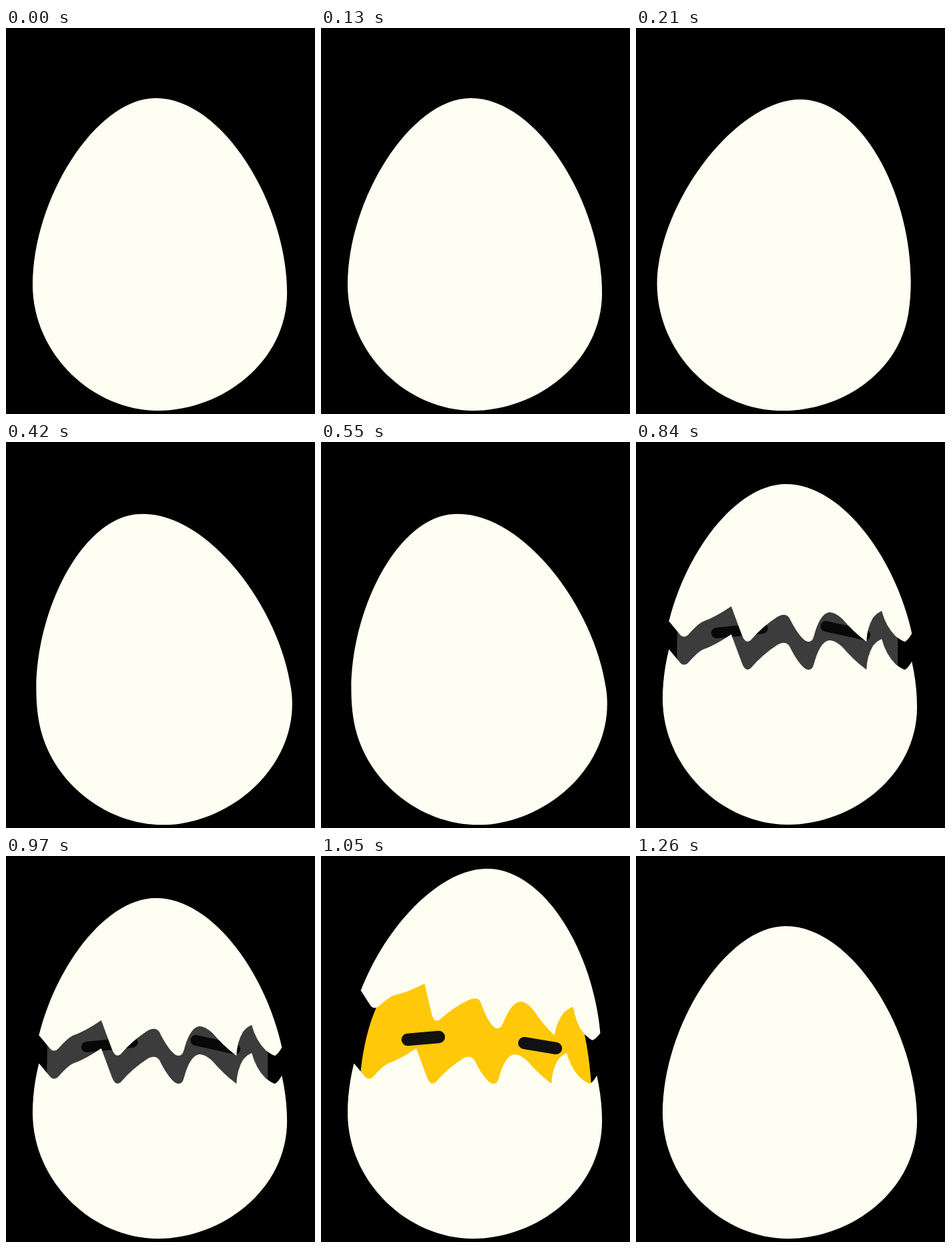
Write an HTML page with a canvas that moves like this. It is 464 px wide and 578 px high and loops after 1470 ms.

```html
<!DOCTYPE html>
<html lang="en">
<head>
<meta charset="utf-8">
<title>Hatching egg</title>
<style>
  html, body { margin: 0; width: 100%; height: 100%; overflow: hidden; background: #000; }
  canvas { display: block; }
</style>
</head>
<body>
<canvas id="stage" width="464" height="578"></canvas>
<script>
const ctx = document.getElementById('stage').getContext('2d');
const STEP = 210;
const SHELL = '#fefff2', YOLK = '#ffc90a', SHADE = '#3c3c3c';

const egg = new Path2D('M225 105C326 105 422 265 422 397C422 499 325 573 228 573' +
  'C131 573 40 489 40 384C40 257 134 105 225 105Z');

const crack = 'M0 311L50 311L65 329Q71 337 78 331Q92 315 100 311Q118 305 143 288' +
  'L159 331Q164 345 172 339Q190 318 212 304Q224 297 230 305Q244 333 255 340' +
  'Q264 344 267 333Q276 299 290 297Q298 296 310 307Q326 326 346 341' +
  'Q347 320 356 305Q363 297 369 295Q375 318 390 333Q401 341 404 341' +
  'Q409 338 414 329L464 329';
const above = new Path2D(crack + 'V0H0Z');
const below = new Path2D(crack + 'V578H0Z');

const hiddenBody = new Path2D('M61 345L62 283Q80 200 227 190Q370 200 393 283V345Z');
const chickBody = new Path2D('M58 345C60 300 70 255 84 225Q110 150 230 130' +
  'Q350 150 385 225Q402 280 406 345Z');

// Tilts in degrees around the middle of the egg.
function drawShell({ tilt = 0, dx = 0, dy = 0, part }) {
  ctx.save();
  ctx.translate(231 + dx, 339 + dy);
  ctx.rotate(tilt * Math.PI / 180);
  ctx.translate(-231, -339);
  if (part) ctx.clip(part);
  ctx.fillStyle = SHELL;
  ctx.fill(egg);
  ctx.restore();
}

function drawEye(x1, y1, x2, y2, width, color) {
  ctx.lineCap = 'round';
  ctx.lineWidth = width;
  ctx.strokeStyle = color;
  ctx.beginPath();
  ctx.moveTo(x1, y1);
  ctx.lineTo(x2, y2);
  ctx.stroke();
}

function drawCracked(cap) {
  drawShell({ part: below });
  drawShell({ ...cap, part: above });
}

function drawPeek() {
  ctx.fillStyle = SHADE;
  ctx.fill(hiddenBody);
  drawEye(121, 286, 190, 279, 16, '#080808');
  drawEye(285, 276, 344, 289, 16, '#080808');
  drawCracked({ dy: -42 });
}

function drawHatch() {
  ctx.fillStyle = YOLK;
  ctx.fill(chickBody);
  drawEye(130, 275, 177, 271, 18.5, '#111');
  drawEye(305, 280, 353, 288, 18, '#111');
  drawCracked({ tilt: 7.1, dx: 5.5, dy: -86.5 });
}

const poses = [
  () => drawShell({}),
  () => drawShell({ tilt: 9, dx: -1.5, dy: 1 }),
  () => drawShell({ tilt: -8, dy: 0.5 }),
  () => drawShell({}),
  drawPeek,
  drawHatch,
  () => drawShell({})
];

const start = performance.now();

function render() {
  const time = Math.max(0, performance.now() - start);
  ctx.fillStyle = '#000';
  ctx.fillRect(0, 0, 464, 578);
  poses[Math.floor(time / STEP) % poses.length]();
  requestAnimationFrame(render);
}
render();
</script>
</body>
</html>
```
